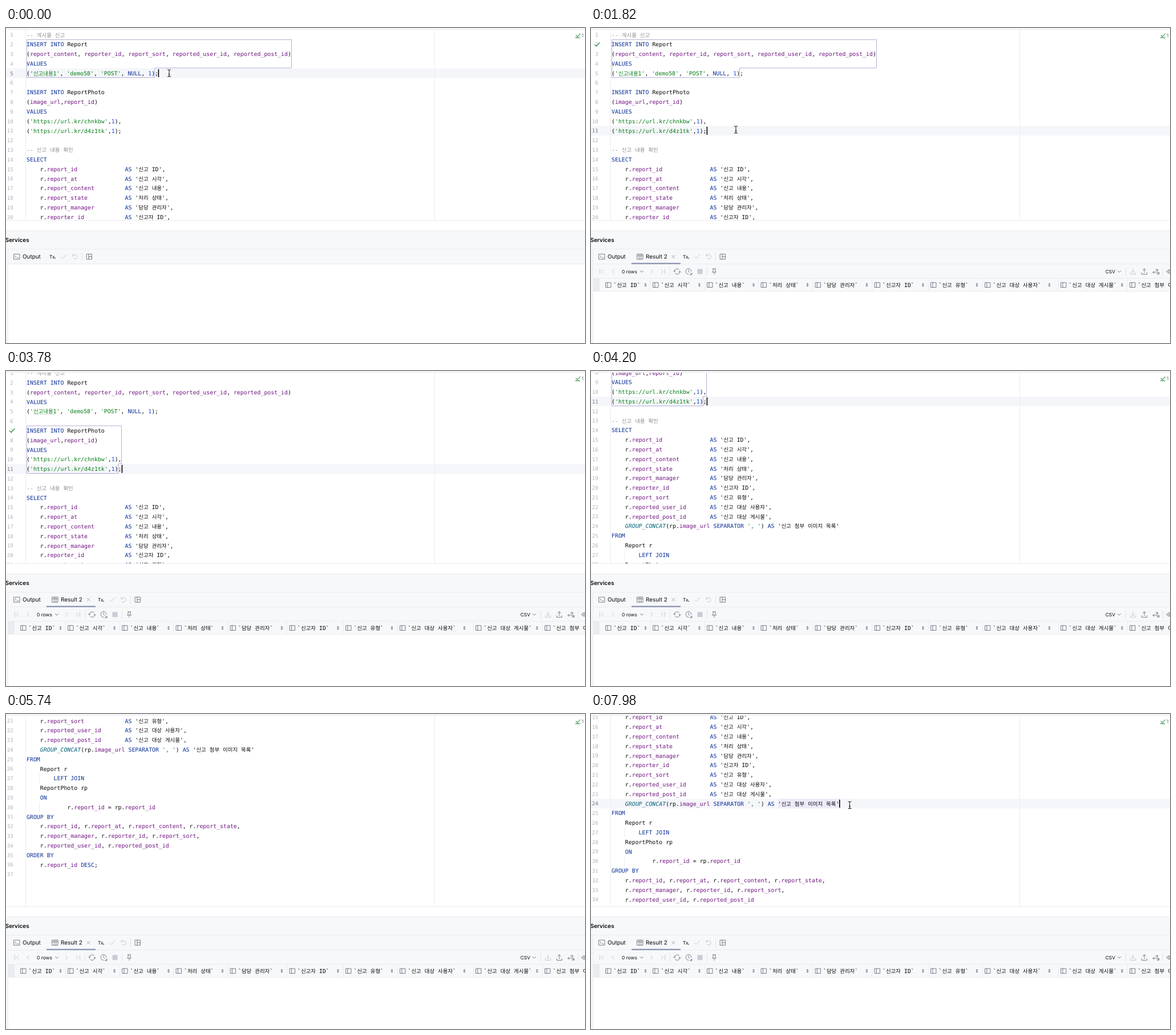
Recreate the animation shown at these times as an HTML page. Size 1015 by 552 pixels, loop 8 s.

```html
<!DOCTYPE html>
<html lang="ko">
<head>
<meta charset="utf-8">
<title>SQL console</title>
<style>
html, body { margin: 0; width: 100%; height: 100%; overflow: hidden; background: #fff; }
svg { display: block; width: 1015px; height: 552px; }
text { white-space: pre; text-rendering: geometricPrecision; fill: #080808; }
.mono { font: 9.88px "DejaVu Sans Mono", monospace; }
.ko { font: 9.43px "Noto Sans CJK KR", "Noto Sans CJK JP", sans-serif; }
.ui { font: 9.92px Inter, sans-serif; }
.small { font: 8.4px Inter, sans-serif; }
.num { font: 9.1px "DejaVu Sans Mono", monospace; text-anchor: end; fill: #aeb3c2; }
.num.on { fill: #767a8a; }
.key { fill: #0a2f96; }
.str { fill: #067d17; }
.col { fill: #701480; }
.lit { fill: #1750eb; }
.rem { fill: #8c8c8c; }
.fn { fill: #00627a; font-style: italic; }
.line { stroke: #ebecf0; fill: none; }
.box { stroke: #b2afd8; fill: none; }
.icon { fill: none; stroke: #6c707e; stroke-width: .9; stroke-linecap: round; stroke-linejoin: round; }
.icon.off { stroke: #c0c3cd; }
</style>
</head>
<body>
<svg viewBox="0 0 1015 552">
  <defs><clipPath id="pane"><rect y="3" width="1015" height="334"/></clipPath></defs>
  <rect width="1015" height="552" fill="#fff"/>
  <rect width="1015" height="2" fill="#f7f8fa"/>
  <g clip-path="url(#pane)">
    <g id="doc">
      <rect id="row" width="1015" height="16.8" fill="#f5f6fa"/>
      <rect id="word" x="328" y="390" width="107" height="16.8" fill="#edebfa"/>
      <path class="line" d="M58.5 440.5v16.8M58.5 490.8v16.8"/>
      <g id="code"></g>
      <path class="box" id="stmt1" d="M36.5 20.5H500.5V70H260.5V86.8H36.5Z"/>
      <path class="box" id="stmt2" d="M36.5 104.5H202.5V171H196.5V187.9H36.5Z"/>
      <path id="done" fill="none" stroke="#4f9d63" stroke-width="1.5" d="M6 0l3.2 3.2L15.5-3.6"/>
      <rect id="caret" width="1.6" height="14" fill="#000"/>
    </g>
  </g>
  <path class="line" d="M0 2.5H1015M34.5 3V337M751.5 3V337M0 337.5H1015"/>
  <path fill="none" stroke="#4f9d63" stroke-width="1.2" d="M999 12.5l2.8 2.8 5-5.6M998 17.5l1.7-1 1.7 1 1.7-1 1.7 1 1.7-1"/>
  <text class="small" x="1009" y="16" style="fill:#6c707e">1</text>

  <rect y="355" width="1015" height="59" fill="#f7f8fa"/>
  <rect y="414" width="3" height="138" fill="#f7f8fa"/>
  <path class="line" d="M0 355.5H1015M0 387.5H1015M3.5 388V552M4 413.5H1015"/>
  <text class="ui" x="-1.3" y="375.4" style="font-weight:600">Services</text>
  <text class="ui" x="29" y="404.4">Output</text>
  <g id="tabs"></g>

  <g id="result">
    <rect x="71" y="411.6" width="86" height="2.2" fill="#8792ab"/>
    <text class="ui" x="96" y="404.4">Result 2</text>
    <rect x="4" y="414" width="1011" height="47.5" fill="#f7f8fa"/>
    <rect x="4" y="439" width="11" height="22" fill="#ebecf0"/>
    <path class="line" d="M4 438.5H1015M4 461.5H1015"/>
    <text class="small" x="54" y="430">0 rows</text>
    <text class="small" x="901.7" y="430">CSV</text>
    <rect x="186.5" y="422.3" width="9" height="9" rx="1" fill="#c9ccd6"/>
    <g id="grid"></g>
  </g>
  <g id="mouse" fill="none">
    <path id="beam" stroke="#fff" stroke-width="2.6" d="M-3-6.3Q0-6.3 0-4.3Q0-6.3 3-6.3M0-4.3V4.3M-3 6.3Q0 6.3 0 4.3Q0 6.3 3 6.3M-1.6 2H1.6"/>
    <use href="#beam"/>
  </g>
</svg>
<script>
const $ = id => document.getElementById(id);
const CH = 5.949, KO = 8.68, LH = 16.8;
const mid = n => 12 + LH * (n - 1);

function add(parent, tag, attrs, text) {
  const el = document.createElementNS('http://www.w3.org/2000/svg', tag);
  for (const k in attrs) el.setAttribute(k, attrs[k]);
  if (text) el.textContent = text;
  return parent.appendChild(el);
}

// Places each word on the character grid and returns the next x.
function write(parent, x, y, str, cls = '') {
  for (const run of str.match(/[가-힣]+|[^가-힣\s]+|\s+/g) || []) {
    const ko = /[가-힣]/.test(run);
    if (run.trim()) add(parent, 'text', { x: x.toFixed(2), y: y.toFixed(2), class: (ko ? 'ko ' : 'mono ') + cls }, run);
    x += run.length * (ko ? KO : CH);
  }
  return x;
}

const field = (name, label) => `    r.${name}`.padEnd(29) + `AS '${label}',`;
const lines = [
  '-- 게시물 신고',
  'INSERT INTO Report',
  '(report_content, reporter_id, report_sort, reported_user_id, reported_post_id)',
  'VALUES',
  "('신고내용1', 'demo58', 'POST', NULL, 1);",
  '',
  'INSERT INTO ReportPhoto',
  '(image_url,report_id)',
  'VALUES',
  "('https://url.kr/chnkbw',1),",
  "('https://url.kr/d4z1tk',1);",
  '',
  '-- 신고 내용 확인',
  'SELECT',
  field('report_id', '신고 ID'),
  field('report_at', '신고 시각'),
  field('report_content', '신고 내용'),
  field('report_state', '처리 상태'),
  field('report_manager', '담당 관리자'),
  field('reporter_id', '신고자 ID'),
  field('report_sort', '신고 유형'),
  field('reported_user_id', '신고 대상 사용자'),
  field('reported_post_id', '신고 대상 게시물'),
  "    GROUP_CONCAT(rp.image_url SEPARATOR ', ') AS '신고 첨부 이미지 목록'",
  'FROM',
  '    Report r',
  '        LEFT JOIN',
  '    ReportPhoto rp',
  '    ON',
  '            r.report_id = rp.report_id',
  'GROUP BY',
  '    r.report_id, r.report_at, r.report_content, r.report_state,',
  '    r.report_manager, r.reporter_id, r.report_sort,',
  '    r.reported_user_id, r.reported_post_id',
  'ORDER BY',
  '    r.report_id DESC;',
  ''
];

const rules = [
  ['rem', '--.*'],
  ['str', "'[^']*'"],
  ['fn', 'GROUP_CONCAT'],
  ['key', '\\b(?:INSERT|INTO|VALUES|NULL|SELECT|AS|SEPARATOR|FROM|LEFT|JOIN|ON|GROUP|ORDER|BY|DESC)\\b'],
  ['col', '\\b[a-z]+_\\w+'],
  ['lit', '\\b\\d+\\b']
];
const lexer = new RegExp(rules.map(r => `(${r[1]})`).join('|'), 'g');

const nums = lines.map((line, i) => {
  const y = mid(i + 1) + 3.6;
  let x = 36, pos = 0;
  for (const m of line.matchAll(lexer)) {
    x = write($('code'), x, y, line.slice(pos, m.index));
    let cls = rules[m.slice(1).findIndex(Boolean)][0];
    if (cls === 'str' && line.slice(0, m.index).endsWith('AS ')) cls = '';
    x = write($('code'), x, y, m[0], cls);
    pos = m.index + m[0].length;
  }
  write($('code'), x, y, line.slice(pos));
  return add($('code'), 'text', { x: 12.7, y: y - .2, class: 'num' }, String(i + 1));
});
add($('code'), 'path', { d: 'M48 84.8' + 'l1.5-1.3 1.5 1.3'.repeat(13), fill: 'none', stroke: '#9ccaa3', 'stroke-width': .7 });

const icon = (parent, x, y, d, off) =>
  add(parent, 'path', { class: off ? 'icon off' : 'icon', d, transform: `translate(${x} ${y})` });

const shape = {
  term: 'M-5-4.5H5V4.5H-5ZM-3-1.8l1.8 1.6L-3 1.4M.3 2H2.8',
  table: 'M-5-4.5H5V4.5H-5ZM-5-1.5H5M-1.7-4.5V4.5M1.7-4.5V4.5',
  check: 'M-4.5.3L-1.5 3.3 4.5-3.5',
  undo: 'M-4-4.2V-1.2H-1M-3.8-1.4A4.1 4.1 0 1 1-2.6 3.4',
  layout: 'M-4.5-4.5H4.5V4.5H-4.5ZM-1-4.5V4.5M-1 0H4.5',
  close: 'M-2.5-2.5L2.5 2.5M2.5-2.5L-2.5 2.5',
  down: 'M-2.6-1.2L0 1.4 2.6-1.2',
  prev: 'M1.5-3.5L-2 0 1.5 3.5',
  next: 'M-1.5-3.5L2 0-1.5 3.5',
  first: 'M-3.5-3.8V3.8M3-3.5L-.5 0 3 3.5',
  last: 'M3.5-3.8V3.8M-3-3.5L.5 0-3 3.5',
  reload: 'M-4.8.2A4.6 4.6 0 0 1 3.6-2.8M4.8-.2A4.6 4.6 0 0 1-3.6 2.8M-6.3-1.2l1.5 1.6L-3-1M6.3 1.2L4.8-.4 3 1',
  clock: 'M5-.2A5 5 0 1 0 0 4.8M0-3V0L2 1.4M3 5.6H6V2.8Z',
  pin: 'M-2.6-4.8H2.6M-1.8-4.8V-1L-3.5 1.2H3.5L1.8-1V-4.8M0 1.2V5',
  load: 'M0-5V2M-2.6-.6L0 2 2.6-.6M-4.6 2V4.8H4.6V2',
  send: 'M0 2V-5M-2.6-2.4L0-5 2.6-2.4M-4.6 2V4.8H4.6V2',
  swap: 'M-5 1.5H-1L3-3M0-3.5H3.5V0M-3-.5L-5 1.5-3 3.5M1 2H5M3 4.6H6V2Z',
  eye: 'M-4.5 0Q0-6.5 4.5 0Q0 6.5-4.5 0ZM1.6 0A1.6 1.6 0 1 1 1.6-.1',
  head: 'M-4.5-4.2H4.5V4.2H-4.5ZM-1.6-4.2V4.2',
  sort: 'M-1.2-1.4L0-2.7 1.2-1.4ZM-1.2 1.4L0 2.7 1.2 1.4Z',
  bar: 'M0-7V7'
};

icon($('result').parentNode.insertBefore(add($('tabs'), 'g', {}), $('result')), 19, 400.7, shape.term);
const tools = $('tabs');
add(tools, 'text', { x: 76, y: 404, class: 'small' }, 'Tx');
icon(tools, 86, 403, 'M-1 0H1L0 1.2Z');
icon(tools, 101, 400.7, shape.check, true);
icon(tools, 121, 400.7, shape.undo, true);
icon(tools, 133.5, 400.7, shape.bar, true).style.stroke = '#dfe1e6';
icon(tools, 146, 400.7, shape.layout);

const grid = $('grid');
icon(grid, 86, 400.7, shape.table);
icon(grid, 144.5, 400.7, shape.close, true).style.stroke = '#9a9eaa';
const bar = [
  ['first', 19, 1], ['prev', 39, 1], ['down', 89], ['next', 106, 1], ['last', 126, 1],
  ['reload', 151], ['clock', 171], ['pin', 216], ['down', 926],
  ['load', 950, 1], ['send', 970], ['swap', 990], ['eye', 1013.5]
];
for (const [name, x, off] of bar) icon(grid, x, 426.7, shape[name], off);
for (const x of [138.5, 203.5, 937.5, 1002.5]) icon(grid, x, 426.7, shape.bar).style.stroke = '#dfe1e6';

// label, icon x, sort arrow x
const heads = [
  ['신고 ID', 30.5, 95.5], ['신고 시각', 113.5, 190], ['신고 내용', 208.5, 285],
  ['처리 상태', 303, 379.5], ['담당 관리자', 398, 483.5], ['신고자 ID', 502, 582],
  ['신고 유형', 600.5, 676.5], ['신고 대상 사용자', 695.5, 803.5],
  ['신고 대상 게시물', 828.5, 931], ['신고 첨부 이미지 목록', 949.5, 1070]
];
heads.forEach(([label, x, arrow], i) => {
  if (i) add(grid, 'path', { class: 'line', d: `M${Math.round(x - 9.6) + .5} 439V461` });
  icon(grid, x, 450.3, shape.head);
  icon(grid, arrow, 450.3, shape.sort).style.fill = '#6c707e';
  write(grid, x + 9, 454, '`' + label + '`');
});

const scroll = [
  [3710, 0], [3780, 8.4], [3920, 45], [4130, 110], [4340, 160], [4550, 189], [4760, 200],
  [5250, 200], [5390, 232], [5530, 290], [5670, 328], [5740, 336], [5810, 336.4],
  [6440, 336.4], [6510, 331], [6650, 302], [6860, 266.6], [7070, 248], [7280, 241.4]
];
const path = [
  [560, 286, 79], [1260, 280, 86], [1400, 271, 122], [1540, 258, 165], [1680, 254, 178],
  [6020, 254, 178], [6230, 237.5, 220], [7140, 237.5, 220], [7280, 241, 212],
  [7420, 290, 200], [7560, 385, 174], [7700, 460, 153], [7840, 453.5, 159.5]
];

function lerp(table, t, k = 1) {
  const i = table.findIndex(p => p[0] > t);
  if (i < 0) return table[table.length - 1][k];
  if (!i) return table[0][k];
  const a = table[i - 1], b = table[i];
  return a[k] + (b[k] - a[k]) * (t - a[0]) / (b[0] - a[0]);
}

const show = (id, on) => $(id).setAttribute('visibility', on ? 'visible' : 'hidden');
const move = (id, x, y) => $(id).setAttribute('transform', `translate(${x.toFixed(2)} ${y.toFixed(2)})`);

function draw(t) {
  const [row, caret] = t < 1680 ? [5, 266.6] : t < 7840 ? [11, 202.6] : [24, 435];
  const ran = t >= 910;
  move('doc', 0, -lerp(scroll, t));
  move('row', 0, mid(row) - 8.4);
  move('caret', caret, mid(row) - 7);
  nums.forEach((n, i) => n.classList.toggle('on', i + 1 === row));
  show('stmt1', t < 2170);
  show('stmt2', t >= 2170 && t < 7840);
  show('word', t >= 7910);
  show('done', ran);
  move('done', 0, mid(t < 3150 ? 2 : 7));
  show('result', ran);
  move('tabs', ran ? 85 : 0, 0);
  show('mouse', t < 560 || (t >= 1260 && t < 2590) || t >= 6020);
  move('mouse', lerp(path, t), lerp(path, t, 2));
}

$('mouse').lastElementChild.remove();
const dark = $('beam').cloneNode();
dark.id = 'ink';
dark.setAttribute('stroke', '#222');
dark.setAttribute('stroke-width', '1.1');
$('mouse').append(dark);

const start = performance.now();
function tick() {
  const t = Math.max(0, performance.now() - start) % 8000;
  draw(Math.floor(t / 70) * 70);
  requestAnimationFrame(tick);
}
tick();
</script>
</body>
</html>
```
